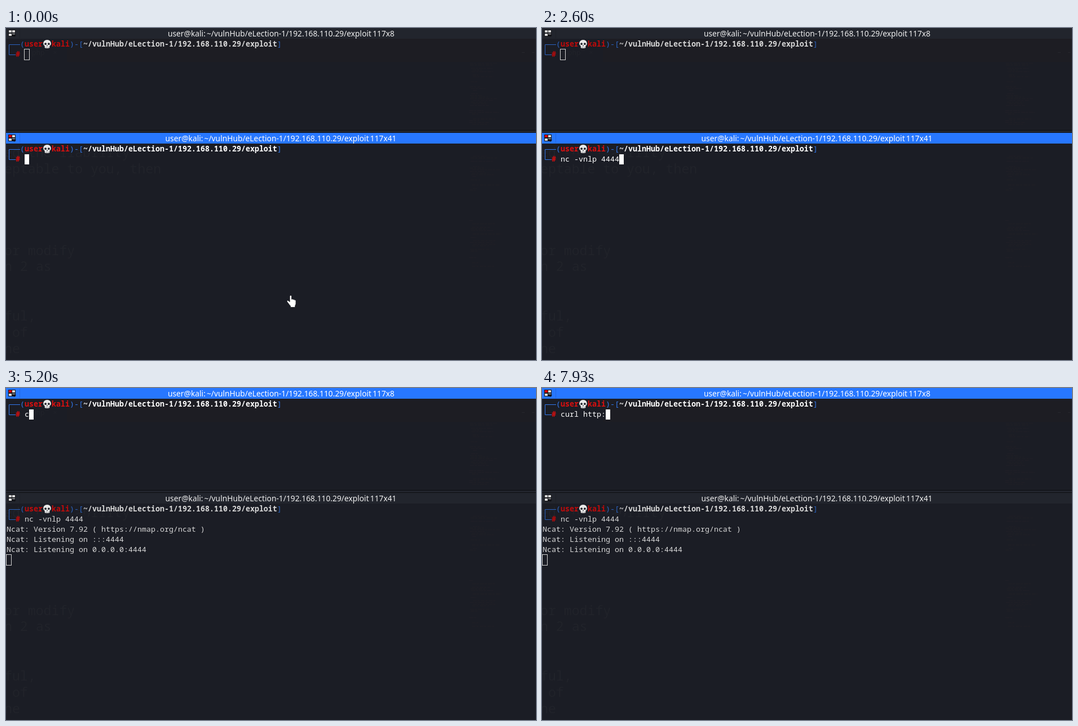
An HTML page for the animation above (8000 ms loop, 940 by 589 pixels).

```html
<!DOCTYPE html>
<html lang="en">
<head>
<meta charset="utf-8">
<title>Split terminal</title>
<style>
  html, body { margin: 0; width: 100%; height: 100%; overflow: hidden; background: #1b1d25; }
  svg { display: block; width: 940px; height: 589px; }
  text { white-space: pre; }
  .pane { --fg: #d6d6d6; --red: #c10a0a; --blue: #2b63c0; --bar: #22252d; --mark: #d0d0d0; --label: #f0f0f0; }
  .pane.on { --fg: #fff; --red: #dc0f0f; --blue: #3279ee; --bar: #2777ff; --mark: #e00; --label: #fff; }
  .mono { font: 13.333px "Noto Sans Mono", monospace; fill: var(--fg); }
  .bold { font-weight: 700; }
  .red { fill: var(--red); }
  .blue { fill: var(--blue); }
  .bar { fill: var(--bar); }
  .label { font: 13.8px "Noto Sans", sans-serif; word-spacing: -1.5px; fill: var(--label); text-anchor: end; }
  .frame { fill: none; stroke: var(--blue); }
  .mask { fill: #1b1d25; }
  .caret { fill: none; stroke: #d2d2d2; }
  .on .caret { fill: #fff; stroke: none; }
  .ghost { font: 23.2px "Noto Sans Mono", monospace; fill: #21232a; }
</style>
</head>
<body>
<svg viewBox="0 0 940 589">
  <rect width="940" height="589" fill="#1b1d25"/>
  <rect x="108" y="19" width="832" height="41" fill="#1d1d23"/>
  <g id="backdrop"></g>
  <g id="panes"></g>
  <path d="M0 181.5H940M0 185.5H940" stroke="#0d0e12"/>
  <path d="M0 183.5H940" stroke="#22252d" stroke-width="3"/>
  <path id="hand" fill="#fff" stroke="#15161b" stroke-width=".8" stroke-linejoin="round"
    d="M503.2 476.2c0-2.4 3.4-2.4 3.4 0v5.2c.6-1 2.5-.8 2.8.5.8-.8 2.3-.4 2.5.8 1-.5 2.2.1 2.2 1.5v4.5c0 2-.9 3-1.3 4.2v2.6h-8.2v-2.2c-1.6-1.6-3-3.8-4.6-5.7-1.4-1.8-2.2-3-1.3-3.8 1.2-1 2.9.2 4.5 2z"/>
  <g id="beam" fill="none">
    <path d="M-3-8H3M0-8V8M-3 8H3" stroke="#0b0c0f" stroke-width="3.4"/>
    <path d="M-3-8H3M0-8V8M-3 8H3" stroke="#fff" stroke-width="1.4"/>
  </g>
</svg>
<script>
const LOOP = 8000, CELL = 8, LEFT = 33;
const PATH = '~/vulnHub/eLection-1/192.168.110.29/exploit';
const $ = id => document.getElementById(id);

const output = [
  'Ncat: Version 7.92 ( https://nmap.org/ncat )',
  'Ncat: Listening on :::4444',
  'Ncat: Listening on 0.0.0.0:4444'
];

// [start, typed text]
const upperKeys = [
  [0, ''], [5200, 'c'], [5270, 'cu'], [5400, 'cul'], [5470, 'culr '],
  [5870, 'culr'], [5930, 'cu'], [6070, 'cur'], [6200, 'curl'], [6470, 'curl '],
  [7270, 'curl h'], [7400, 'curl ht'], [7530, 'curl htt'], [7670, 'curl http'], [7930, 'curl http:']
];
const lowerKeys = [
  [0, ''], [1000, 'n'], [1130, 'nc'], [1270, 'nc '], [1400, 'nc -'], [1470, 'nc -v'],
  [1600, 'nc -vn'], [1800, 'nc -vnlp'], [2000, 'nc -vnlp '], [2070, 'nc -vnlp 4'],
  [2270, 'nc -vnlp 44'], [2470, 'nc -vnlp 444'], [2600, 'nc -vnlp 4444']
];
const ENTER = 2730, SWITCH = 3470;

// [start, x, y] of the text pointer; no place means it is hidden
const beamPath = [
  [0], [930, 496, 470], [1000],
  [3070, 495, 467], [3130, 396, 372], [3200, 272, 258],
  [3270, 201, 182], [3330, 178, 158], [SWITCH, 178, 163], [4130]
];

const word = (x, y, s, cls = '') => `<text class="mono ${cls}" x="${x}" y="${y}">${s}</text>`;

const skull = `<path fill="#e9e9e9" d="M73 21c-4.4 0-6.8 3-6.8 6.5 0 2.2.9 3.4 2.5 4.2v2.5c0 1.2 1 1.8 4.3 1.8s4.3-.6 4.3-1.8v-2.5c1.6-.8 2.5-2 2.5-4.2 0-3.5-2.4-6.5-6.8-6.5z"/>
  <g fill="#22242b"><circle cx="70.1" cy="28.2" r="1.9"/><circle cx="75.9" cy="28.2" r="1.9"/>
  <path d="M73 30l1.1 2h-2.2zM71 33.5h.7v2H71zM74.3 33.5h.7v2h-.7z"/></g>`;

function pane(id, y, size, end) {
  return `<g id="${id}" class="pane" transform="translate(0 ${y})">
    <rect class="bar" width="940" height="19"/>
    <path d="M24.5 1V18" stroke="#000" opacity=".12"/>
    <rect x="4" y="3" width="13" height="12" fill="#14151a"/>
    <path d="M11 4h5v4h-5zM5 10h5v4H5zM11 10h5v1h-5z" fill="#d8d8d8"/>
    <path d="M5 4h5v4H5z" fill="var(--mark)"/>
    <path d="M11 12h7l-3.5 4z" fill="#14151a"/>
    <text class="label" x="${end}" y="15">user@kali: ${PATH} ${size}</text>
    <path class="frame" d="M25 29.5H5.5V47.5H17"/>
    ${word(25, 33, '(', 'blue')}${word(LEFT, 33, 'user', 'bold red')}${skull}
    ${word(81, 33, 'kali', 'bold red')}${word(113, 33, ')-[', 'blue')}
    ${word(137, 33, PATH, 'bold')}${word(481, 33, ']', 'blue')}
    ${word(17, 51, '#', 'bold red')}
    <rect class="mask" x="${LEFT}" y="38" height="18"/>
    ${word(LEFT, 51, '', 'typed')}
    <g class="out"><rect class="mask" x="1" y="56" width="351" height="72"/>
      ${id === 'lower' ? output.map((s, i) => word(1, 69 + i * 18, s)).join('') : ''}</g>
    <rect class="caret"/>
  </g>`;
}

function backdrop() {
  const ghosts = [
    [229, 'ed the liability'], [258, 'eptable to you, then'], [403, 'or modify'],
    [431, 'n 2 as'], [519, 'ful,'], [548, ' of'], [577, 'ne']
  ];
  let s = ghosts.map(([y, g]) => `<text class="ghost" x="-3" y="${y}">${g}</text>`).join('');
  s += '<text class="ghost" x="46" y="48" style="font-size:12.5px">php  ×</text>';
  s += '<path d="M915 43.5h5M933 43.5h4" stroke="#26272d"/>';
  let seed = 7, d = '';
  const rnd = () => (seed = seed * 16807 % 2147483647) / 2147483647;
  for (let y = 62; y < 430; y += 3) {
    const gap = (y > 172 && y < 212) || (y > 292 && y < 340);
    const x = 822 + Math.floor(rnd() * 7), w = 6 + rnd() * 46;
    if (!gap && rnd() < .72) d += `M${x} ${y + .5}h${w.toFixed(1)}`;
  }
  return s + `<path d="${d}" stroke="#201f26" stroke-dasharray="7 1 4 2"/>`;
}

$('backdrop').innerHTML = backdrop();
$('panes').innerHTML = pane('upper', 0, '117x8', 689) + pane('lower', 186, '117x41', 692.5);

const parts = Object.fromEntries(['upper', 'lower'].map(id => {
  const el = $(id), get = c => el.querySelector(c);
  return [id, { el, mask: get('rect.mask'), typed: get('.typed'), out: get('.out'), caret: get('.caret') }];
}));

const at = (list, t) => list.findLast(k => k[0] <= t);
const within = (t, a, b) => t >= a && t < b;
const show = (el, yes) => el.setAttribute('visibility', yes ? 'visible' : 'hidden');
const set = (el, attrs) => { for (const k in attrs) el.setAttribute(k, attrs[k]); };

function drawPane(p, text, focused, entered, blinkOff) {
  const col = LEFT + text.length * CELL;
  p.el.classList.toggle('on', focused);
  p.typed.textContent = text;
  p.mask.setAttribute('width', text ? col + CELL - LEFT : 0);
  show(p.out, entered);
  const x = entered ? 1 : col, y = entered ? 110 : 38;
  set(p.caret, focused
    ? { x, y, width: CELL, height: 18 }
    : { x: x - .5, y: y - .5, width: CELL + 1, height: 19 });
  show(p.caret, !blinkOff);
}

function draw(t) {
  const top = t >= SWITCH;
  drawPane(parts.upper, at(upperKeys, t)[1], top, false,
    within(t, 4070, 4670) || within(t, 7000, 7270));
  drawPane(parts.lower, at(lowerKeys, t)[1], !top, t >= ENTER,
    within(t, 70, 670) || within(t, 3330, SWITCH));
  show($('hand'), t < 130);
  const [, x, y] = at(beamPath, t);
  show($('beam'), x);
  if (x) $('beam').setAttribute('transform', `translate(${x + .5} ${y})`);
}

const start = performance.now();
function tick() {
  draw((performance.now() - start) % LOOP);
  requestAnimationFrame(tick);
}
draw(0);
requestAnimationFrame(tick);
</script>
</body>
</html>
```
